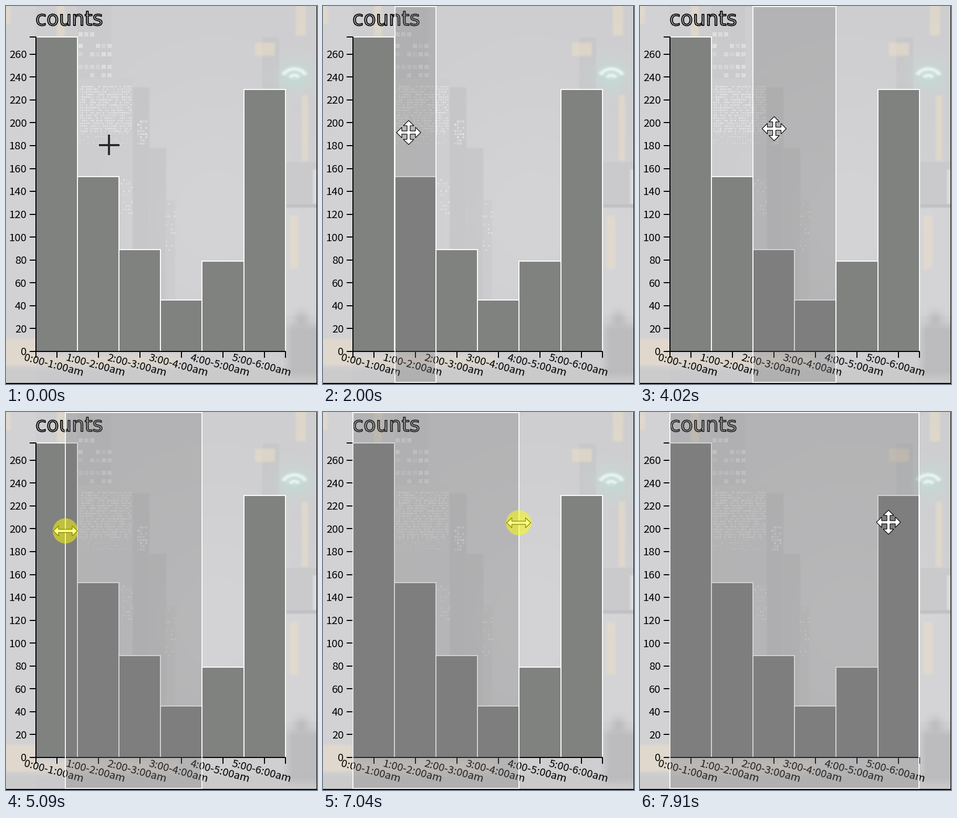
Recreate the animation shown at these times as a matplotlib script. Size 592 by 720 pixels, loop 8000 ms.

```python
import numpy as np
import matplotlib.pyplot as plt
from matplotlib.animation import FuncAnimation
from matplotlib.patches import Circle, Polygon, Rectangle
from matplotlib.patheffects import Stroke

W, H, DPI = 592, 720, 100
LOOP, STEP = 8000, 40
PT = 72 / DPI  # points per pixel
SANS = "Noto Sans CJK JP"

fig = plt.figure(figsize=(W / DPI, H / DPI), dpi=DPI)
ax = fig.add_axes([0, 0, 1, 1])
ax.axis("off")


# ---- faded night street behind the chart ----
yy, xx = np.mgrid[0:H, 0:W] + 0.5
rng = np.random.default_rng(4)
CREAM = (236, 222, 198)


def blend(img, mask, color):
    img += mask[..., None] * (np.array(color, float) - img)


def soft_box(x0, y0, x1, y1, soft):
    def ramp(v, a, b):
        return np.clip(np.minimum(v - a, b - v) / soft + 0.5, 0, 1)
    return ramp(xx, x0, x1) * ramp(yy, y0, y1)


def glow(x, y, rx, ry):
    return np.exp(-((xx - x) / rx) ** 2 - ((yy - y) / ry) ** 2)


def windows(img, x0, y0, x1, y1, dx, dy, size, density):
    for y in range(y0, y1, dy):
        for x in range(x0, x1, dx):
            if rng.random() < density:
                part = img[y:y + size, x:x + size]
                part += rng.uniform(0.25, 0.75) * (234 - part)


def buildings(img):
    # x0, y0, x1, y1, grey level
    blocks = [
        (-9, -9, 57, 730, 213),
        (136, -9, 200, 140, 200),
        (136, 138, 240, 330, 205),
        (241, 155, 273, 470, 194),
        (273, 270, 305, 560, 196),
        (305, 370, 322, 560, 202),
        (488, 60, 520, 158, 197),
        (533, 383, 592, 590, 215),
        (533, 297, 592, 383, 199),
        (584, 311, 601, 377, 228),
        (533, 378, 601, 384, 187),
    ]
    for *box, level in blocks:
        blend(img, 0.65 * soft_box(*box, 4), (level, level, level + 2))


def lights(img):
    streaks = [
        (97, -9, 112, 58),
        (-9, 0, 9, 34),
        (474, 70, 512, 95),
        (552, -9, 571, 56),
        (563, 170, 575, 295),
        (540, 400, 556, 500),
        (-9, 634, 57, 685),
    ]
    for box in streaks:
        blend(img, 0.55 * soft_box(*box, 6), CREAM)
    blend(img, 0.4 * soft_box(57, 664, 330, 690, 14), CREAM)


def street():
    img = np.ones((H, W, 3)) * (206, 206, 208)
    blend(img, 0.8 * glow(400, 400, 220, 260), (213, 213, 216))
    buildings(img)
    lights(img)
    blend(img, 0.7 * soft_box(-30, 690, 620, 740, 16), (200, 200, 201))
    blend(img, 0.7 * soft_box(536, 608, 610, 705, 18), (181, 181, 184))
    blend(img, 0.7 * glow(562, 597, 14, 16), (181, 181, 184))
    windows(img, 140, 152, 238, 240, 4, 5, 3, 0.75)
    windows(img, 140, 242, 238, 264, 5, 6, 2, 0.5)
    windows(img, 218, 330, 240, 400, 5, 7, 3, 0.4)
    windows(img, 250, 218, 270, 264, 5, 6, 4, 0.5)
    windows(img, 304, 375, 320, 466, 5, 8, 3, 0.4)
    for y in (50, 72, 88, 112, 128):
        windows(img, 138, y, 198, y + 1, 11, 9, 8, 0.7)
    # green signal
    blend(img, 0.8 * glow(550, 132, 30, 26), (192, 222, 213))
    for r in (18, 6):
        d = np.hypot((xx - 549) / 1.25, yy - 138)
        upper = np.clip((138 - yy - 0.4 * abs(xx - 549)) / 6 + 0.8, 0, 1)
        blend(img, 0.8 * upper * np.exp(-((d - r) / 4) ** 2), (242, 250, 247))
    img[:, 591:] = 0
    img[718:] = 0
    return img.clip(0, 255).astype(np.uint8)


ax.imshow(street(), extent=(0, W, H, 0), interpolation="nearest", aspect="auto")
ax.set_xlim(0, W)
ax.set_ylim(H, 0)


# ---- chart ----
X0, BAND, BASE, UNIT = 57, 79.1, 658, 2.178
COUNTS = [275, 153, 89, 45, 79, 229]
END = X0 + BAND * len(COUNTS)


def line(xs, ys):
    ax.plot(xs, ys, color="black", lw=2 * PT, zorder=4, solid_capstyle="butt")


for i, n in enumerate(COUNTS):
    x = X0 + BAND * i
    ax.add_patch(Rectangle((x, BASE - n * UNIT), BAND, n * UNIT, fc="#808280",
                           ec="white", lw=1.9 * PT, zorder=3))
    line([x + BAND / 2] * 2, [BASE, BASE + 12])
    ax.text(33 + BAND * i, 675, f"{i}:00-{i + 1}:00am", family=SANS,
            size=20.4 * PT, rotation=-15, rotation_mode="anchor",
            ha="left", va="baseline", zorder=5)

for n in range(0, 261, 20):
    y = BASE - n * UNIT
    line([45, X0], [y, y])
    ax.text(39.5, y + 7.3, str(n), family=SANS, size=20.4 * PT,
            ha="right", va="baseline", zorder=5)

line([45, X0, X0, 45], [59, 59, BASE, BASE])
line([X0, X0, END, END], [BASE + 12, BASE, BASE, BASE + 12])
ax.text(56, 37, "counts", family="DejaVu Sans", size=38.5 * PT, color="#b4b4b4",
        va="baseline", zorder=5,
        path_effects=[Stroke(linewidth=1.8 * PT, foreground="black")])


# ---- motion ----
def smooth(u):
    return u * u * (3 - 2 * u)


def cubic(u):
    return 4 * u ** 3 if u < 0.5 else 1 - 4 * (1 - u) ** 3


def ease_out(u):
    return 1 - (1 - u) ** 3


def linear(u):
    return u


# (first step, last step, steps, goal, easing)
CURSOR = [
    (70, 140, 2, (173, 231), smooth),
    (920, 1230, 5, (195, 255), linear),
    (1920, 2000, 2, (163, 241), smooth),
    (2610, 2840, 4, (294, 241), smooth),
    (4020, 4330, 5, (215, 226), ease_out),
    (4860, 5090, 4, (113, 226.5), smooth),
    (5960, 5960, 1, (81, 227), linear),
    (6040, 6340, 5, (360, 206), smooth),
    (6510, 6660, 3, (372.5, 211), smooth),
    (7210, 7510, 5, (472, 211), smooth),
    (7680, 7680, 1, (473, 210), linear),
]
BRUSH = [
    (920, 1230, 5, (173, 195), linear),
    (1380, 1620, 4, (137, 215), cubic),
    (2610, 2840, 4, (267, 345), smooth),
    (3240, 3470, 4, (215, 373), cubic),
    (4860, 5090, 4, (113, 373), smooth),
    (5340, 5570, 4, (57, 373), cubic),
    (7210, 7510, 5, (57, 472), smooth),
    (7680, 7910, 4, (57, 531), cubic),
]
PRESSES = [(690, 1380), (2380, 3240), (4630, 5340), (7040, 7680)]


def track(start, moves, t):
    pos = np.array(start, float)
    for t0, t1, n, goal, ease in moves:
        if t < t0:
            break
        step = 1 if n == 1 else min(n, 1 + int((t - t0) / (t1 - t0) * (n - 1)))
        pos += (np.array(goal) - pos) * ease(step / n)
    return pos


# ---- moving parts ----
def four_ways(arm):
    turn = np.array([(0, 1), (-1, 0)])
    return np.vstack([arm @ np.linalg.matrix_power(turn, k) for k in range(4)])


MOVE = four_ways(np.array([(-3, -3), (-3, -13), (-10, -13),
                           (0, -23), (10, -13), (3, -13)]))
CROSS = four_ways(np.array([(-2, -2), (-2, -19.5), (2, -19.5)]))
HALF = np.array([(-13, 3), (-13, 9.5), (-23, 0), (-13, -9.5), (-13, -3)])
RESIZE = np.vstack([HALF, -HALF])

brush = ax.add_patch(Rectangle((0, 0.5), 1, 716.5, fc=(0.467, 0.467, 0.467, 0.3),
                               ec="white", lw=1.8 * PT, zorder=6))
pointer = ax.add_patch(Polygon(MOVE, closed=True, lw=1.2 * PT, zorder=7))
halo = ax.add_patch(Circle((0, 0), 24, fc=(1, 1, 0, 0.5), ec="none", zorder=8))


def pointer_shape(t, x, edges, pressed):
    if t < 1380:
        return CROSS
    if pressed:
        return MOVE if t < 4000 else RESIZE
    return RESIZE if np.abs(edges - x).min() < 4 else MOVE


def draw(k):
    t = k * STEP + 30
    x, y = track((196, 264.5), CURSOR, t)
    edges = track((173, 173), BRUSH, t)
    pressed = any(a <= t < b for a, b in PRESSES)

    brush.set_visible(t >= 920)
    brush.set_x(edges[0])
    brush.set_width(edges[1] - edges[0])

    shape = pointer_shape(t, x, edges, pressed)
    pointer.set_xy(shape + (x, y))
    if shape is CROSS:
        pointer.set(facecolor="#2a2a2e", edgecolor="none")
    else:
        pointer.set(facecolor="white", edgecolor="black")
    halo.set_center((x, y - (1 if t < 4000 else 0)))
    halo.set_visible(pressed)
    return brush, pointer, halo


anim = FuncAnimation(fig, draw, frames=LOOP // STEP, interval=STEP,
                     init_func=lambda: draw(0), repeat=True, repeat_delay=0)
plt.show()
```
